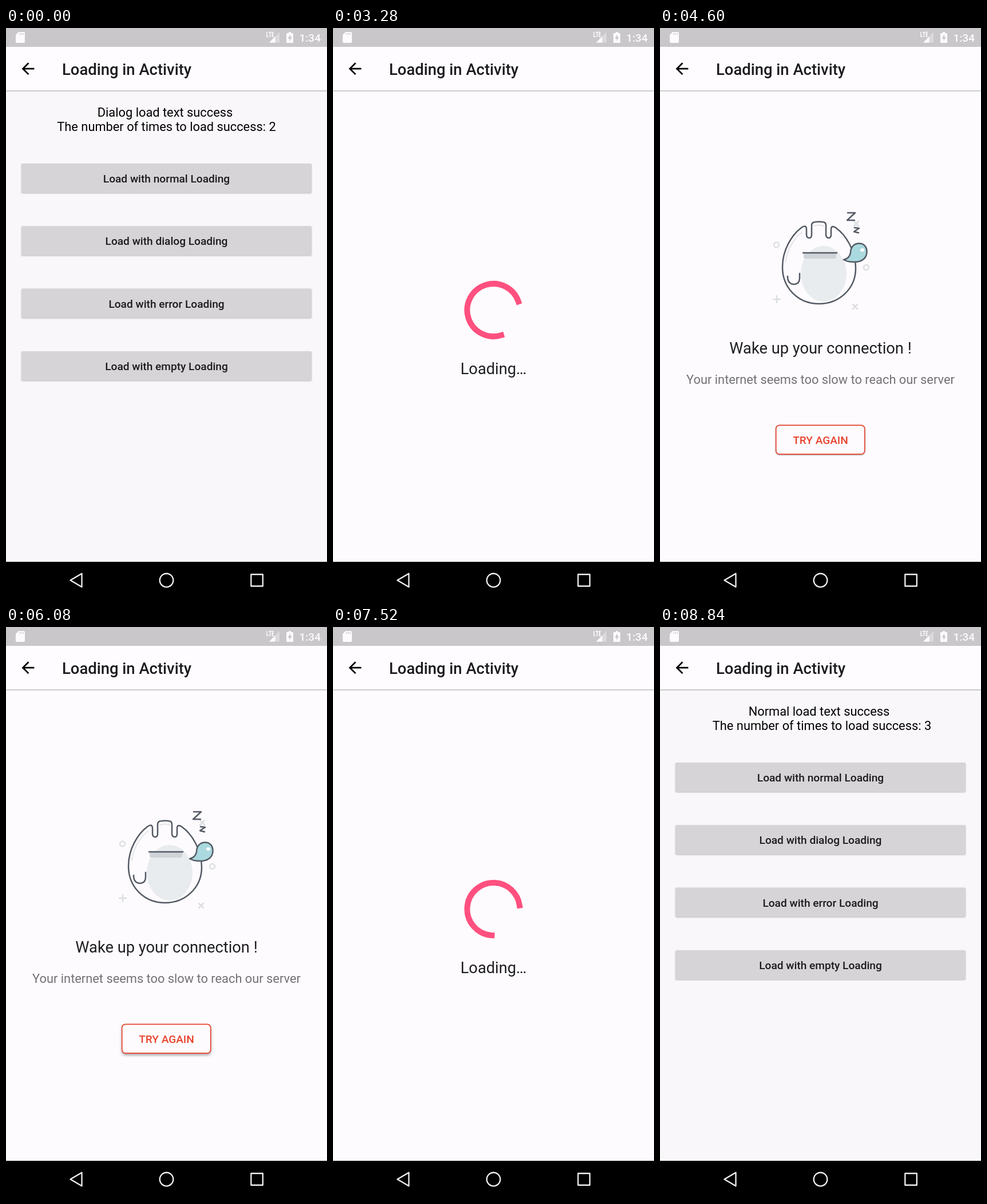
An HTML page that plays this animation: 561x998 px, repeating every 8.88 s.

```html
<!DOCTYPE html>
<html lang="en">
<head>
<meta charset="utf-8">
<title>Loading in Activity</title>
<style>
html, body { margin: 0; height: 100%; overflow: hidden; background: #fdfbfe; }
svg { display: block; width: 100vw; height: 100vh; font-family: Roboto, sans-serif; }
.mid { text-anchor: middle; }
.bold { font-weight: 500; }
.line { fill: none; stroke: #545a64; stroke-width: 2.5; stroke-linecap: round; stroke-linejoin: round; }
.faint { fill: none; stroke: #dcdee2; stroke-width: 2.5; stroke-linecap: round; }
#bar { filter: drop-shadow(0 1px 1.2px rgba(0,0,0,.36)); }
#buttons rect { fill: #d6d4d7; filter: drop-shadow(0 1.5px 1px rgba(0,0,0,.26)); }
</style>
</head>
<body>
<svg viewBox="0 0 561 998">
  <rect width="561" height="998" fill="#fdfbfe"/>

  <g id="list">
    <rect y="109" width="561" height="824" fill="#f9f7fa"/>
    <g class="mid" font-size="21.82">
      <text id="status" x="278" y="154.5"></text>
      <text id="count" y="180"></text>
    </g>
    <g id="buttons" class="mid bold" font-size="19.1" fill="#1b1a1c"></g>
  </g>

  <g id="loading">
    <circle id="arc" cx="280.5" cy="493" r="46" pathLength="360" fill="none"
      stroke="#ff507f" stroke-width="10" stroke-linecap="square"/>
    <text class="mid" x="280.5" y="605" font-size="27.28" fill="#1f1e20">Loading…</text>
  </g>

  <g id="error">
    <ellipse cx="286" cy="429.5" rx="40" ry="48.5" fill="#e8ecee"/>
    <path d="M251 394H308V400Q308 403 305 403H254Q251 403 251 400Z" fill="#d0d4d9"/>
    <g class="faint">
      <path d="M220 408C222 388 233 369 248 357M269 346Q278 343 286 346" stroke="#e3e5e9" stroke-width="2"/>
      <circle cx="203.5" cy="379" r="4.5"/>
      <circle cx="360.5" cy="418.5" r="4.5"/>
      <path d="M198 474H210M204 468V480M337 483L345 491M345 483L337 491M339 338L347 346M347 338L339 346"/>
    </g>
    <g class="line">
      <path d="M278 482C240 482 214 453 214 418C214 388 230 362 247 349Q256 343 256 352V361Q256 367 261 367
        Q265 367 265 361V345Q265 339 272 339Q278 338 284 339Q290 339 290 345V361Q290 367 295 367
        Q299 367 299 361V352Q299 344 307 349C324 361 342 388 342 420C342 455 314 482 278 482Z"/>
      <path d="M250 393H309M223 434Q223 448 235 448Q244 447 244 437V429"/>
      <path d="M321 405Q331 403 333 393C333 382 340 376.500 348 376.500C356 376.500 361.500 382 361.500 391
        C361.500 403 352 409 340 409Q328 409 321 405Z" fill="#aad9df"/>
      <path d="M328 323H341L327 336H340M340 349L348 350L339 356L347 358"/>
    </g>
    <ellipse cx="353.500" cy="388" rx="3.500" ry="3" fill="#fdfbfe"/>
    <g class="mid">
      <text x="280.5" y="568.5" font-size="27.28" fill="#1f1e20">Wake up your connection !</text>
      <text x="280.5" y="622" font-size="21.82" fill="#737174">Your internet seems too slow to reach our server</text>
      <rect id="retry" x="202.700" y="694.300" width="155" height="50.500" rx="6" fill="#fdfbfe" stroke="#e8432d" stroke-width="1.7"/>
      <text class="bold" x="280.5" y="727" font-size="19.1" fill="#e8432d">TRY AGAIN</text>
    </g>
  </g>

  <rect id="bar" y="33" width="561" height="76" fill="#fefcff"/>
  <path transform="translate(22.1 54.800) scale(1.364)" d="M20 11H7.83l5.59-5.59L12 4l-8 8 8 8 1.41-1.41L7.830 13H20z"/>
  <text class="bold" x="98" y="81.500" font-size="27.4" fill="#1b1a1c">Loading in Activity</text>

  <rect width="561" height="33" fill="#c9c7ca"/>
  <g fill="#fdfbfe">
    <path d="M22 7H31Q33 7 33 9V24Q33 26 31 26H19Q17 26 17 24V12Z"/>
    <path d="M478 7V25.500H460Z" opacity=".35"/>
    <path d="M470.500 14.700V25.500H460Z"/>
    <path d="M494 7H498V9H501Q502 9 502 10V25Q502 26 501 26H491Q490 26 490 25V10Q490 9 491 9H494Z"/>
    <text class="bold" x="550" y="24" font-size="19.1" text-anchor="end">1:34</text>
  </g>
  <path d="M456 7V15H459M459 7.500H464M461.500 7.500V16M468 7.500H465.500V15.300H468M465.500 11.300H468"
    fill="none" stroke="#fdfbfe" stroke-width="1.5"/>
  <path d="M24 9V12M27 9V12M30 9V12" stroke="#c9c7ca" stroke-width="1.3"/>
  <path d="M497 11L492.500 18.500H495.500V23L499.800 15.800H497Z" fill="#c9c7ca"/>

  <rect y="933" width="561" height="65"/>
  <g fill="none" stroke="#f1f0f2" stroke-width="2.3" stroke-linejoin="round">
    <path d="M112.500 965.300L132.500 953.500V977Z"/>
    <circle cx="280.5" cy="965.300" r="11.800"/>
    <rect x="428.300" y="955" width="20.500" height="20.500"/>
  </g>
</svg>
<script>
const LOOP = 8880, STEP = 40;
const $ = id => document.getElementById(id);

$('buttons').innerHTML = ['normal', 'dialog', 'error', 'empty'].map((kind, i) => {
  const y = 237 + i * 109.3;
  return `<rect x="27" y="${y}" width="507" height="51" rx="2"/>
    <text x="280.5" y="${y + 33}">Load with ${kind} Loading</text>`;
}).join('');

// Bezier (0,0) (.2,0) (.1,1) (.5,1), flat outside that range
function ease(x) {
  if (x <= 0) return 0;
  if (x >= .5) return 1;
  let lo = 0, hi = 1;
  for (let i = 0; i < 30; i++) {
    const s = (lo + hi) / 2, r = 1 - s;
    if (.6 * r * r * s + .3 * r * s * s + .5 * s ** 3 < x) lo = s; else hi = s;
  }
  return lo * lo * (3 - 2 * lo);
}

// Head runs ahead for half a cycle, then the tail catches up, while the ring turns
function spin(ms) {
  const x = ms % 1333 / 1333;
  const tail = 270 * ease(x - .5), head = 270 * ease(x);
  const turn = 90 * x + 720 * ms / 4444 + tail - 90;
  show('arc', ms > 0);
  $('arc').setAttribute('stroke-dasharray', `${Math.max(head - tail, .01)} 720`);
  $('arc').setAttribute('transform', `rotate(${turn} 280.5 493)`);
}

function show(id, on) {
  $(id).style.display = on ? '' : 'none';
}

function render(t) {
  const done = t >= 8840;
  const error = t >= 4600 && t < 6760;
  const list = t < 2520 || done;
  show('list', list);
  show('error', error);
  show('loading', !list && !error);
  if (list) {
    $('status').textContent = `${done ? 'Normal' : 'Dialog'} load text success`;
    $('count').textContent = `The number of times to load success: ${done ? 3 : 2}`;
    $('count').setAttribute('x', done ? 283 : 280.5);
  } else if (error) {
    const press = t < 6080 ? 0 : t < 6120 ? .5 : 1;
    $('retry').style.filter =
      `drop-shadow(0 ${1.8 + 2.7 * press}px ${1.2 + 2 * press}px rgba(0,0,0,.32))`;
  } else {
    spin(t < 4600 ? t - 2578 : t - 6770);
  }
}

const start = performance.now();
function tick() {
  const t = (performance.now() - start) % LOOP;
  render(Math.floor(t / STEP) * STEP);
  requestAnimationFrame(tick);
}
tick();
</script>
</body>
</html>
```
